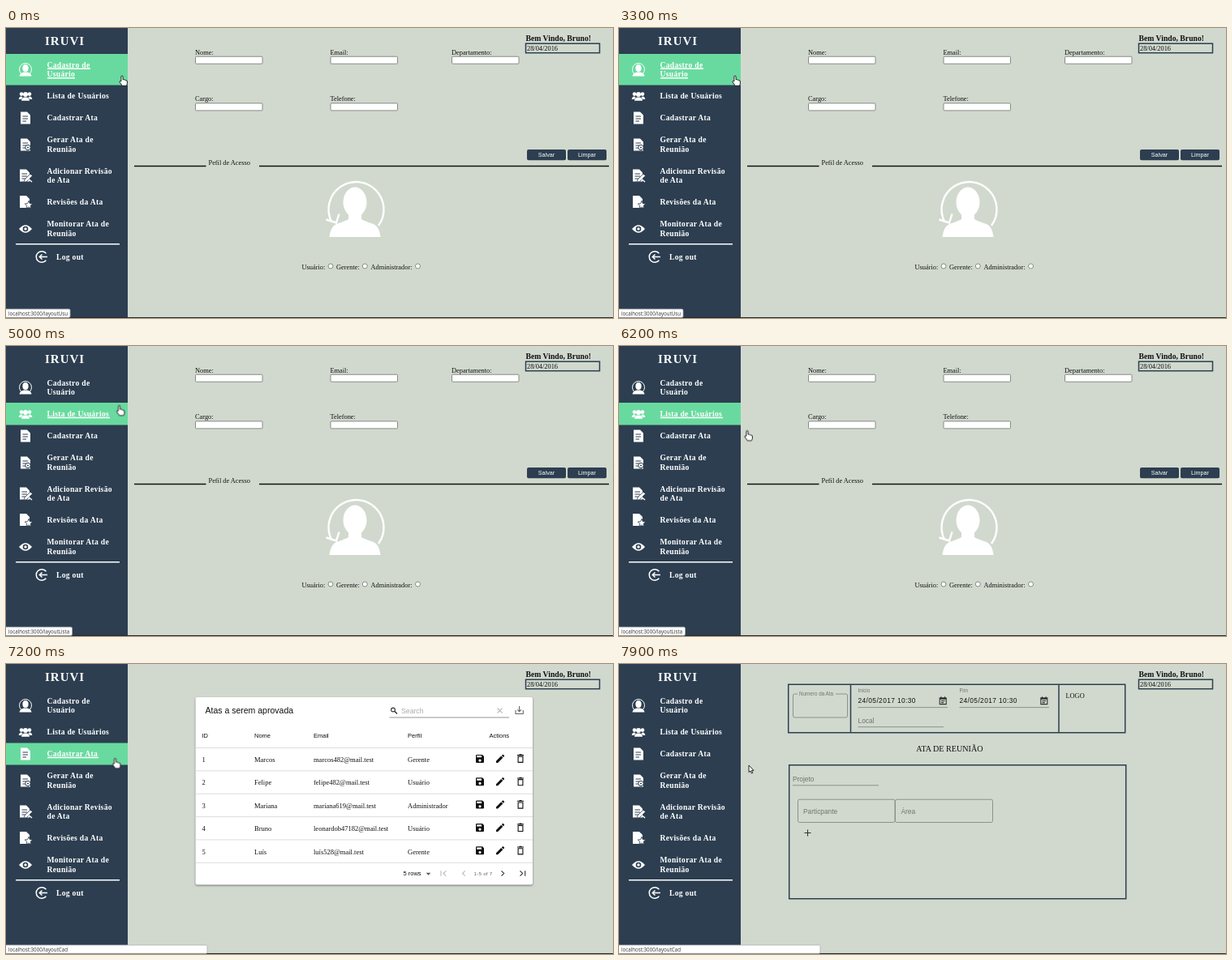
Animation, 748 px wide and 358 px high, one loop 8 s. Source, as an HTML page:

```html
<!DOCTYPE html>
<html lang="pt-BR">
<head>
<meta charset="utf-8">
<title>Atas de reunião</title>
<style>
html, body { margin: 0; width: 100%; height: 100%; overflow: hidden; background: #d1d9ce; }
svg.stage { display: block; width: 748px; height: 358px; }
text { font-family: "Liberation Serif", Times, serif; font-size: 8.35px; fill: #111; white-space: pre; }
.sans text, text.sans { font-family: "Liberation Sans", Arial, sans-serif; }
.menu text { font-size: 9.6px; font-weight: bold; letter-spacing: .3px; fill: #fff; }
.menu .brand { font-size: 15px; letter-spacing: 1px; }
.status text { font: 6.2px "Open Sans", sans-serif; fill: #333; }
.status rect { fill: #fff; stroke: #aab0b0; stroke-width: .8; }
.field { fill: #fff; stroke: #858c86; stroke-width: 1; }
.navy { fill: none; stroke: #2c3e50; stroke-width: 1.5; }
.hint { fill: #6f756f; }
.rule { stroke: #858b84; stroke-width: .9; fill: none; }
.line { fill: none; stroke: #fff; stroke-width: 1.5; }
.dark { fill: none; stroke: #333; stroke-width: 1.1; }
.pale { fill: none; stroke: #bbb; stroke-width: 1.1; }
.card { fill: #fff; filter: drop-shadow(0 1px 1.2px #0007); }

/* 1.25% is 100 ms */
.step { animation: 8s step-end infinite; }
#hover1 { animation-name: hover1; }
#hover2 { animation-name: hover2; }
#hover3 { animation-name: hover3; }
#form { animation-name: form; }
#list { animation-name: list; }
#minutes { animation-name: minutes; }
#urlUsu { animation-name: urlUsu; }
#urlLista { animation-name: urlLista; }
#urlCad { animation-name: urlCad; }
#pointer { animation-name: move; }
#hand { animation-name: hand; }
#arrow { animation-name: arrow; }
@keyframes hover1 { 0% { visibility: visible } 51.25%, 100% { visibility: hidden } }
@keyframes hover2 { 0% { visibility: hidden } 51.25% { visibility: visible } 78.75%, 100% { visibility: hidden } }
@keyframes hover3 { 0% { visibility: hidden } 82.5% { visibility: visible } 98.75%, 100% { visibility: hidden } }
@keyframes form { 0% { visibility: visible } 78.75%, 100% { visibility: hidden } }
@keyframes list { 0% { visibility: hidden } 78.75% { visibility: visible } 91.25%, 100% { visibility: hidden } }
@keyframes minutes { 0% { visibility: hidden } 91.25%, 100% { visibility: visible } }
@keyframes urlUsu { 0% { visibility: visible } 53.75%, 100% { visibility: hidden } }
@keyframes urlLista { 0% { visibility: hidden } 53.75% { visibility: visible } 88.75%, 100% { visibility: hidden } }
@keyframes urlCad { 0% { visibility: hidden } 88.75%, 100% { visibility: visible } }
@keyframes hand { 0% { visibility: visible } 78.75% { visibility: hidden } 82.5% { visibility: visible } 98.75%, 100% { visibility: hidden } }
@keyframes arrow { 0% { visibility: hidden } 78.75% { visibility: visible } 82.5% { visibility: hidden } 98.75%, 100% { visibility: visible } }
@keyframes move {
  0% { transform: translate(143px, 59px) }
  50% { transform: translate(142px, 64px) }
  51.25% { transform: translate(140px, 71px) }
  52.5% { transform: translate(139.5px, 73.5px) }
  75% { transform: translate(142px, 80px) }
  76.25% { transform: translate(150px, 93px) }
  77.5% { transform: translate(158px, 104.5px) }
  78.75% { transform: translate(161px, 112px) }
  81.25% { transform: translate(157px, 114px) }
  82.5% { transform: translate(146px, 116px) }
  83.75% { transform: translate(138px, 116.5px) }
  85% { transform: translate(134.5px, 116.5px) }
  97.5% { transform: translate(147px, 120px) }
  98.75%, 100% { transform: translate(160px, 125px) }
}
</style>
</head>
<body>
<svg class="stage" viewBox="0 0 748 358">
  <defs>
    <path id="page" d="M-6-7.5H2L6-3.5V7.5H-6Z" fill="#fff"/>
    <g id="lines" class="navy" style="stroke-width:1"><path d="M-3.5-2H3M-3.5 1H3M-3.5 4H1"/></g>
    <g id="save"><path fill="#111" fill-rule="evenodd" d="M-5-4Q-5-5-4-5H3L5-3V4Q5 5 4 5H-4Q-5 5-5 4ZM-3.8-3.8V-1.6H2V-3.8ZM0 .6A1.6 1.6 0 1 0 .01 .6Z"/></g>
    <g id="edit" fill="#111"><path d="M-5 5V2.9L1.2-3.3 3.3-1.2-2.9 5ZM1.8-3.9 3-5Q3.4-5.3 3.8-5L5-3.8Q5.3-3.4 5-3L3.9-1.8Z"/></g>
    <g id="bin" fill="none" stroke="#111" stroke-width="1.1"><path d="M-2.9-2.6V4.5H2.9V-2.6ZM-4-4.3H4M-1.5-5H1.5"/></g>
    <g id="calendar" class="dark"><path d="M-4-3.5H4V4.3H-4ZM-2.3-5V-3M2.3-5V-3M-2.3 .2H2.3M-2.3 2.3H1"/><path d="M-4-2.4H4" stroke-width="1.8"/></g>
  </defs>

  <rect width="748" height="358" fill="#d1d9ce"/>
  <rect width="150" height="358" fill="#2c3e50"/>

  <g id="hover1" class="step"><rect y="32" width="150" height="38.5" fill="#69da9f"/><path class="line" stroke-width="1" d="M51 50.2H104M51 61.7H85"/></g>
  <g id="hover2" class="step"><rect y="70" width="150" height="27.5" fill="#69da9f"/><path class="line" stroke-width="1" d="M51 88.5H128"/></g>
  <g id="hover3" class="step"><rect y="97.5" width="150" height="27" fill="#69da9f"/><path class="line" stroke-width="1" d="M51 115.5H114"/></g>

  <g class="menu">
    <text class="brand" x="48" y="20.5">IRUVI</text>
    <text x="50.5" y="48.5">Cadastro de<tspan x="50.5" dy="11.5">Usuário</tspan></text>
    <text x="50.5" y="87">Lista de Usuários</text>
    <text x="50.5" y="114">Cadastrar Ata</text>
    <text x="50.5" y="141">Gerar Ata de<tspan x="50.5" dy="11.5">Reunião</tspan></text>
    <text x="50.5" y="179.5">Adicionar Revisão<tspan x="50.5" dy="11.5">de Ata</tspan></text>
    <text x="50.5" y="218">Revisões da Ata</text>
    <text x="50.5" y="245">Monitorar Ata de<tspan x="50.5" dy="11.5">Reunião</tspan></text>
    <text x="62" y="285.5">Log out</text>
    <path class="line" d="M12 266.7H140"/>
  </g>

  <g fill="#fff">
    <g transform="translate(24 51)">
      <path class="line" stroke-width="1" style="stroke-width:1" d="M-5.6 5A7.5 7.5 0 1 1 5.6 5"/>
      <ellipse cy="-1.5" rx="3.6" ry="4.5"/><path d="M-7.5 8.5Q-7 4.5-2 3.5H2Q7 4.5 7.5 8.5Z"/>
    </g>
    <g transform="translate(24 84)">
      <circle cx="-5" cy="-2.4" r="2.3"/><circle cx="5" cy="-2.4" r="2.3"/><circle cy="-2" r="3"/>
      <path d="M-8.3 4Q-8 .7-5 .6L-3.5 1.5-5.2 4ZM8.3 4Q8 .7 5 .6L3.5 1.5 5.2 4ZM-5 5.8Q-4.6 2-1.5 1.6H1.5Q4.6 2 5 5.8Z"/>
    </g>
    <g transform="translate(24 111)"><use href="#page"/><use href="#lines"/></g>
    <g transform="translate(24 144)"><use href="#page"/><use href="#lines"/><circle cx="3" cy="3.5" r="3.2" stroke="#2c3e50"/><circle cx="3" cy="3.5" r="1" fill="#2c3e50"/></g>
    <g transform="translate(23 182)"><use href="#page"/><use href="#lines"/><path d="M0 5 7-2 9.5 .5 2.5 7.5-1 8.3Z" stroke="#2c3e50" stroke-width=".8"/><path d="M3 3 9 8" class="line"/></g>
    <g transform="translate(23 214.5)"><use href="#page"/><path d="M5-1.2 6.4 2.2 9.8 2.5 7.2 4.8 8 8.3 5 6.4 2 8.3 2.8 4.8 .2 2.5 3.6 2.2Z" stroke="#2c3e50" stroke-width=".8"/></g>
    <g transform="translate(24 248)"><path d="M-8 0Q0-9.5 8 0Q0 9.5-8 0Z"/><circle r="3.3" fill="#2c3e50"/><circle r="1.7"/></g>
    <g transform="translate(44 282.5)" class="line"><path d="M5.4-4.2A6.8 6.8 0 1 0 5.4 4.2M7 0H-2.5M.5-3-2.7 0 .5 3"/></g>
  </g>

  <text x="640.5" y="16" style="font-size:9.7px;font-weight:bold">Bem Vindo, Bruno!</text>
  <rect class="navy" x="640.5" y="19.2" width="91" height="11.5"/>
  <text x="642" y="28">28/04/2016</text>

  <g id="form" class="step">
    <g id="fields"></g>
    <g class="sans">
      <rect x="642" y="150" width="48" height="13.3" rx="2" fill="#2c3e50"/>
      <rect x="692" y="150" width="48" height="13.3" rx="2" fill="#2c3e50"/>
      <g style="font-size:7.2px">
        <text x="666" y="159" text-anchor="middle" style="font-size:7.2px;fill:#fff">Salvar</text>
        <text x="716" y="159" text-anchor="middle" style="font-size:7.2px;fill:#fff">Limpar</text>
      </g>
    </g>
    <path d="M158 170.6H246.5M312 170.6H743" stroke="#111" stroke-width="1.5"/>
    <text x="249.5" y="169">Pefil de Acesso</text>
    <g fill="#fff">
      <path class="line" style="stroke-width:2.4" d="M401 239A34 34 0 1 1 459 244M394.5 236.5 407 240.5 410.5 229.5"/>
      <ellipse cx="430" cy="215" rx="14.5" ry="18.5"/>
      <path d="M422 226H438V236Q441 238 453 242Q460 245 461.5 258H398.5Q400 245 407 242Q419 238 422 236Z"/>
    </g>
    <text x="364.5" y="297.5">Usuário:</text>
    <text x="407" y="297.5">Gerente:</text>
    <text x="449.5" y="297.5">Administrador:</text>
    <circle class="field" cx="400" cy="294" r="3"/>
    <circle class="field" cx="442.3" cy="294" r="3"/>
    <circle class="field" cx="507.5" cy="294" r="3"/>
  </g>

  <g id="list" class="step">
    <rect class="card" x="233.5" y="41" width="415.5" height="231.5" rx="2"/>
    <g class="sans">
      <text x="245.5" y="61" style="font-size:10.5px">Atas a serem aprovada</text>
      <text x="487" y="60.5" style="font-size:8.7px;fill:#aaa">Search</text>
    </g>
    <g class="dark"><circle cx="477" cy="56.5" r="2.4"/><path d="M478.8 58.3 482 61.5" stroke-width="1.4"/></g>
    <path class="pale" d="M605.5 54.5 611.5 60.5M611.5 54.5 605.5 60.5"/>
    <path class="rule" d="M472.5 66H620"/>
    <path class="dark" style="stroke:#666" d="M628 57V61.5H637.3V57M632.6 52V58.5M630.3 56.3 632.6 58.7 635 56.3"/>
    <g id="rows"></g>
    <g class="sans">
      <text x="489.5" y="261.2" style="font-size:7.5px">5 rows</text>
      <text x="576.5" y="261" style="font-size:6.2px;letter-spacing:.25px;fill:#666">1-5 of 7</text>
    </g>
    <path d="M517.7 257.8H523.3L520.5 260.7Z" fill="#555"/>
    <path class="pale" d="M536 255.3V261.7M542.3 255.3 539 258.5 542.3 261.7M565.7 255.3 562.5 258.5 565.7 261.7"/>
    <path class="dark" d="M610.5 255.3 613.7 258.5 610.5 261.7M633.5 255.3 636.7 258.5 633.5 261.7M639.7 255.3V261.7"/>
  </g>

  <g id="minutes" class="step">
    <path class="navy" d="M208.7 25.2H623.7V84.7H208.7ZM285.5 25.2V84.7M542 25.2V84.7M209.7 124.7H624.7V289.7H209.7Z"/>
    <path class="rule" d="M220 37H216.5Q214.5 37 214.5 39V64Q214.5 66 216.5 66H279.5Q281.5 66 281.5 64V39Q281.5 37 279.5 37H267"/>
    <path class="rule" d="M294.5 53.6H405M419.5 53.6H530M294.5 77.7H400M214 149.8H320"/>
    <rect class="rule" x="220.5" y="167.2" width="119.5" height="28.3" rx="2"/>
    <rect class="rule" x="340.5" y="167.2" width="120" height="28.3" rx="2"/>
    <g class="sans">
      <text class="hint" x="222" y="38.7" style="font-size:6.3px">Numero da Ata</text>
      <text class="hint" x="294.5" y="35" style="font-size:6.3px">Inicio</text>
      <text class="hint" x="419.5" y="35" style="font-size:6.3px">Fim</text>
      <text x="294.5" y="48.3" style="letter-spacing:.4px">24/05/2017 10:30</text>
      <text x="419.5" y="48.3" style="letter-spacing:.4px">24/05/2017 10:30</text>
      <text class="hint" x="294.5" y="73.3">Local</text>
      <text class="hint" x="214" y="145.3">Projeto</text>
      <text class="hint" x="227" y="184.7">Particpante</text>
      <text class="hint" x="347.5" y="184.7">Área</text>
    </g>
    <use href="#calendar" x="399.2" y="45.3"/>
    <use href="#calendar" x="523.8" y="45.3"/>
    <text x="550.5" y="42">LOGO</text>
    <text x="366.3" y="108" style="font-size:10.1px">ATA DE REUNIÃO</text>
    <path class="dark" d="M228.5 208.5H236.5M232.5 204.5V212.5"/>
  </g>

  <rect y="357" width="748" height="1" fill="#25292b"/>
  <g class="status">
    <g id="urlUsu" class="step"><rect x="-2" y="347" width="81" height="10.3" rx="1.5"/><text x="3" y="354.8">localhost:3000/layoutUsu</text></g>
    <g id="urlLista" class="step"><rect x="-2" y="347" width="83.5" height="10.3" rx="1.5"/><text x="3" y="354.8">localhost:3000/layoutLista</text></g>
    <g id="urlCad" class="step"><rect x="-2" y="347" width="250" height="10.3" rx="1.5"/><text x="3" y="354.8">localhost:3000/layoutCad</text></g>
  </g>

  <g id="pointer" class="step" fill="#fff" stroke="#111" stroke-width=".9" stroke-linejoin="round">
    <path id="hand" class="step" d="M-1.1 7V1Q-1.1 0 0 0T1.1 1V4.8Q2.4 4 3.1 5.2Q4.3 4.6 4.9 5.8Q6.4 5.4 6.4 7V9Q6.4 11 5.3 12.3H.2Q-1.2 10-3 7.9Q-3.4 6.6-2.3 6.4Q-1.6 6.4-1.1 7Z"/>
    <path id="arrow" class="step" d="M0 0V8.6L2 6.9 3.4 10 4.8 9.4 3.4 6.4H6Z"/>
  </g>
</svg>
<script>
const put = (id, html) => { document.getElementById(id).innerHTML = html; };
const text = (x, y, s, style = '') => `<text x="${x}" y="${y}" style="${style}">${s}</text>`;

const fields = [['Nome', 233, 32.5], ['Email', 399.5, 32.5], ['Departamento', 549, 32.5],
  ['Cargo', 233, 90.2], ['Telefone', 399.5, 90.2]];
put('fields', fields.map(([label, x, y]) => text(x, y, label + ':') +
  `<rect class="field" x="${x + .5}" y="${y + 2.7}" width="82.5" height="9" rx="1"/>`).join(''));

const columns = [241.5, 306, 379, 495];
const people = [
  ['Marcos', 'marcos482@mail.test', 'Gerente'],
  ['Felipe', 'felipe482@mail.test', 'Usuário'],
  ['Mariana', 'mariana619@mail.test', 'Administrador'],
  ['Bruno', 'leonardob47182@mail.test', 'Usuário'],
  ['Luís', 'luís528@mail.test', 'Gerente']
];
const head = ['ID', 'Nome', 'Email', 'Perfil', 'Actions'].map((label, i) =>
  text([...columns, 595.5][i], 91, label, 'font-size:7.5px')).join('');
const rows = people.map((person, i) => {
  const y = 103.5 + 28.36 * i;
  const cells = [i + 1, ...person].map((s, c) => text(columns[c], y + 17.6, s, 'font-size:8.5px'));
  const icons = ['save', 'edit', 'bin'].map((id, k) => `<use href="#${id}" x="${584 + 25 * k}" y="${y + 13.4}"/>`);
  return cells.join('') + icons.join('');
}).join('');
const rules = Array.from({ length: 6 }, (_, i) => `M233.5 ${103.5 + 28.36 * i}h415.5`).join('');
put('rows', `<g class="sans">${head}</g><path d="${rules}" stroke="#ddd"/>${rows}`);
</script>
</body>
</html>
```
